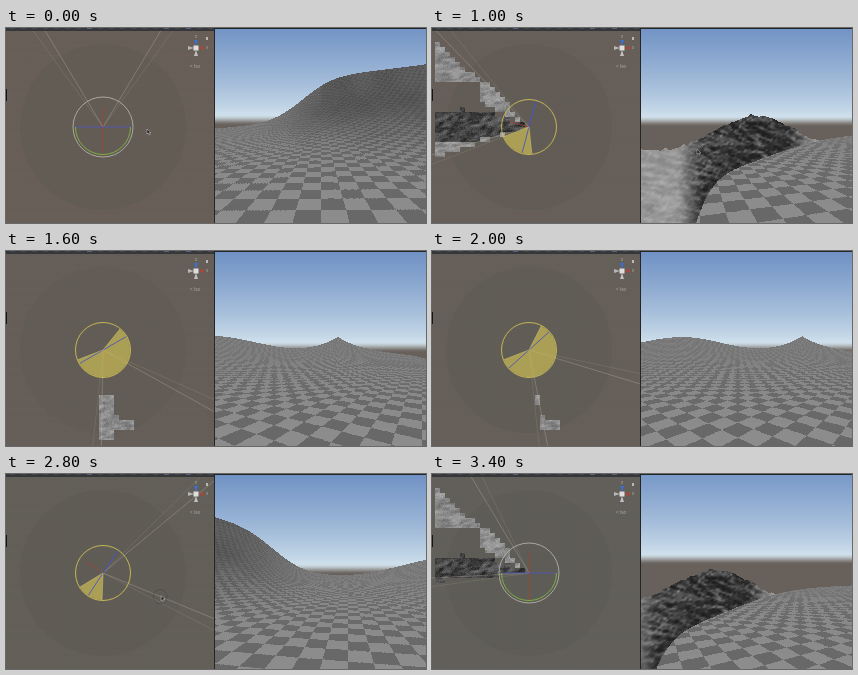
These frames come from a looping animation (420x195 px, 3.5 s). An HTML page with a canvas:

```html
<!DOCTYPE html>
<html lang="en">
<head>
<meta charset="utf-8">
<title>Camera rotation over tiled terrain</title>
<style>
html, body { margin: 0; width: 100%; height: 100%; overflow: hidden; background: #222; }
canvas { display: block; width: 420px; height: 195px; }
</style>
</head>
<body>
<canvas id="stage" width="420" height="195"></canvas>
<script>
const ctx = document.getElementById('stage').getContext('2d');
const LOOP = 3500, STEP = 100;
const CX = 97, CY = 99, FOCAL = 175, VIEW_X = 209, VIEW_W = 211, VIEW_H = 194;
const RAD = Math.PI / 180, HALF_FOV = 31, FAR = 18, TILE = 0.28;

// Time, heading in degrees to the left, terrain eye level, sky horizon.
const POSES = [
  [0, 0, 92, 91], [700, 0, 92, 91], [1200, 125, 96, 93], [1600, 210, 97, 95],
  [1900, 222, 97, 95], [2700, 222, 97, 95], [3000, 392, 94, 92], [3300, 422, 103, 84]
];
const DRAGS = [
  { enter: 100, from: 600, to: 2300, x: 71, y: 109, fromX: 142, fromY: 103, zero: 0, rate: 2.6 },
  { enter: 2300, from: 2700, to: 3300, x: 74, y: 113, fromX: 440, fromY: 150, zero: 222, rate: 1.45 }
];
const PATCHES = [
  { dark: false, d: 'M4 14L24 34L40 46L62 60L74 74L92 95L70 84L56 80L46 68V54H4Z' },
  { dark: true, d: 'M4 84L30 81L60 85L95 97L85 103L40 113H4Z' },
  { dark: false, d: 'M4 103H92V120L70 134V140H4Z' },
  { dark: true, d: 'M46 136L92 116L62 154V173H26L21 154Z' },
  { dark: false, d: 'M17 187H28V182H46V187H58V193H17Z' },
  { dark: false, d: 'M95 142H108V164H114V168H126V180H108V190H95Z' }
].map(p => ({ dark: p.dark, path: new Path2D(p.d) }));

const clamp = (v, a = 0, b = 1) => Math.max(a, Math.min(b, v));
const mix = (a, b, k) => a + (b - a) * k;
const smooth = v => v * v * (3 - 2 * v);
const fade = (a, b, v) => smooth(clamp((v - a) / (b - a)));
const wrap = a => ((a + 180) % 360 + 360) % 360 - 180;
const bump = (b, at, width) => Math.exp(-((wrap(b - at) / width) ** 2));
const plateau = (b, at, half, soft) => 1 / (1 + Math.exp((Math.abs(wrap(b - at)) - half) / soft));

function poseAt(t) {
  const next = POSES.findIndex(p => p[0] > t);
  if (next < 0) return POSES[POSES.length - 1];
  const a = POSES[next - 1], b = POSES[next], k = (t - a[0]) / (b[0] - a[0]);
  return a.map((v, i) => mix(v, b[i], k));
}

function hash(x, y) {
  const s = Math.sin(x * 127.1 + y * 311.7) * 43758.5453;
  return s - Math.floor(s);
}

function noise(x, y) {
  const ix = Math.floor(x), iy = Math.floor(y);
  const fx = smooth(x - ix), fy = smooth(y - iy);
  return mix(mix(hash(ix, iy), hash(ix + 1, iy), fx),
    mix(hash(ix, iy + 1), hash(ix + 1, iy + 1), fx), fy);
}

// Skylines by bearing, as pixels above eye level at the view centre.
const hillAt = b => plateau(b, -30, 36, 5.5);
const groundSkyline = b => -6 + 55 * hillAt(b) - 190 * plateau(b, 129, 34, 4) -
  38 * bump(b, 85, 28) + 18 * Math.exp(-Math.abs(wrap(b - 204.5)) / 9) + 17 * bump(b, 242, 18);
const mountainSkyline = b => -26 + 34 * bump(b, 72, 17) + 20 * bump(b, 121, 10) +
  16 * bump(b, 158, 22);

const view = document.createElement('canvas');
view.width = VIEW_W;
view.height = VIEW_H;
const viewCtx = view.getContext('2d');
const image = viewCtx.createImageData(VIEW_W, VIEW_H);

function put(x, y, r, g = r, b = r) {
  const i = (y * VIEW_W + x) * 4;
  image.data[i] = r;
  image.data[i + 1] = g;
  image.data[i + 2] = b;
  image.data[i + 3] = 255;
}

function skyColor(up) {
  const high = clamp(up / 95) ** 0.7;
  const ground = 1 - fade(-5, 6, up);
  const air = [mix(222, 112, high), mix(236, 146, high), mix(242, 196, high)];
  return [104, 96, 91].map((brown, i) => mix(air[i], brown, ground));
}

function rockShade(bearing, drop, depth) {
  const rough = noise(bearing * 0.5 + drop * 0.2, drop * 0.25) * 0.6 +
    noise(bearing * 1.3 - drop * 0.2, drop * 0.5) * 0.4;
  const sand = 130 + 45 * rough;
  const ripples = 12 * Math.sin(drop * 1.1 + bearing * 0.6) - 20;
  const dune = sand + ripples * fade(120, 140, bearing) * fade(20, 34, drop);
  const rock = 28 + 120 * rough * rough;
  const rocky = fade(53, 60, bearing) * (1 - fade(88, 98, bearing));
  const cap = 0.6 * bump(bearing, 124, 5) * (1 - fade(4, 16, depth));
  return mix(dune, rock, Math.max(rocky, cap));
}

function drawMountain(x, bearing, cos, eye) {
  const top = -mountainSkyline(bearing) + noise(bearing * 0.8, 3) * 3 - 1.5;
  for (let y = Math.max(0, Math.round(eye + top / cos)); y < VIEW_H; y++) {
    const drop = (y - eye) * cos;
    put(x, y, rockShade(bearing, drop, drop - top));
  }
}

function drawGround(x, bearing, cos, eye) {
  const rise = groundSkyline(bearing);
  const far = rise < 0 ? Math.min(FAR, FOCAL / -rise) : FAR;
  const summit = 1 + rise * far / FOCAL;
  const sinB = Math.sin(bearing * RAD), cosB = Math.cos(bearing * RAD);
  const hill = hillAt(bearing);
  let filled = VIEW_H;
  for (let r = 1.1; r < far && filled > 0; r *= 1.006) {
    const k = r / far;
    const height = -1 + summit * k ** 3;
    const y = Math.max(0, Math.round(eye - FOCAL * height / (r * cos)));
    if (y >= filled) continue;
    const odd = (Math.floor(r * sinB / TILE) + Math.floor(r * cosB / TILE)) & 1;
    const contrast = mix(18, 5, clamp((r - 2) / 10));
    const shadow = hill * fade(0.15, 0.75, k) * (45 - 16 * noise(bearing * 0.15, r * 0.3));
    const shade = 122 - shadow + (odd ? contrast : -contrast);
    while (filled > y) put(x, --filled, shade);
  }
}

function drawView(heading, eye, horizon) {
  for (let y = 0; y < VIEW_H; y++) {
    const rgb = skyColor(horizon - y);
    for (let x = 0; x < VIEW_W; x++) put(x, y, ...rgb);
  }
  for (let x = 0; x < VIEW_W; x++) {
    const delta = Math.atan((VIEW_W / 2 - x) / FOCAL);
    const bearing = (heading + delta / RAD + 360) % 360;
    drawMountain(x, bearing, Math.cos(delta), eye);
    drawGround(x, bearing, Math.cos(delta), eye);
  }
  viewCtx.putImageData(image, 0, 0);
  ctx.drawImage(view, VIEW_X, 1);
}

function line(x1, y1, x2, y2, color, width = 1) {
  ctx.strokeStyle = color;
  ctx.lineWidth = width;
  ctx.beginPath();
  ctx.moveTo(x1, y1);
  ctx.lineTo(x2, y2);
  ctx.stroke();
}

function ray(angle, length, color, width = 0.8, back = 0) {
  const c = Math.cos(angle * RAD), s = Math.sin(angle * RAD);
  line(CX - c * back, CY - s * back, CX + c * length, CY + s * length, color, width);
}

function arc(x, y, r, color, width = 1, to = 360) {
  ctx.strokeStyle = color;
  ctx.lineWidth = width;
  ctx.beginPath();
  ctx.arc(x, y, r, 0, to * RAD);
  ctx.stroke();
}

function rect(x, y, w, h, color) {
  ctx.fillStyle = color;
  ctx.fillRect(x, y, w, h);
}

function drawTile(x, y, size, dark) {
  for (let v = y; v < y + size; v++) {
    for (let u = x; u < x + size; u++) {
      const n = noise(u * 0.2 + v * 0.15, v * 0.35) * 0.7 + hash(u, v) * 0.3;
      const g = Math.round(dark ? 25 + n * 95 : 105 + n * 70);
      rect(u, v, 1, 1, `rgb(${g},${g},${g})`);
    }
  }
}

// Only tiles inside the camera's field of view are loaded.
function drawTiles(forward) {
  const size = 5;
  for (let y = 14; y < 193; y += size) {
    for (let x = 3; x < 128; x += size) {
      const px = x + size / 2, py = y + size / 2;
      const angle = Math.atan2(py - CY, px - CX) / RAD;
      if (Math.abs(wrap(angle - forward)) > HALF_FOV + 2) continue;
      const patch = PATCHES.find(p => ctx.isPointInPath(p.path, px, py));
      if (patch) drawTile(x, y, size, patch.dark);
    }
  }
}

function drawCompass() {
  const cone = (turn, color) => {
    ctx.save();
    ctx.translate(190, 20);
    ctx.rotate(turn * RAD);
    ctx.fillStyle = color;
    ctx.fill(new Path2D('M-2 -8H2L0 -2Z'));
    ctx.restore();
  };
  ['#3d6fd0', '#a8483c', '#c0c0c0', '#b5b5b5'].forEach((color, i) => cone(i * 90, color));
  rect(187.5, 17.5, 5, 5, '#dedede');
  rect(200, 9, 2, 3, '#b8b8b8');
  ctx.fillStyle = '#aaa';
  ctx.font = '4.5px Arial, "Liberation Sans", sans-serif';
  ctx.fillText('z', 189, 10);
  ctx.fillText('x', 200, 21);
  ctx.fillText('< Iso', 184, 40);
}

function drawRotator(drag, turned) {
  ray(-90 - turned, 20, 'rgba(175,65,50,.75)', 0.9, drag ? 0 : 28);
  ray(-turned, 27, 'rgba(78,86,180,.9)', 1, 27);
  if (!drag) {
    arc(CX, CY, 30, 'rgba(205,203,195,.75)', 0.9);
    arc(CX, CY, 27.5, 'rgba(130,190,65,.85)', 1, 180);
    return;
  }
  const start = Math.atan2(drag.y - CY, drag.x - CX) / RAD;
  ctx.fillStyle = 'rgba(195,182,85,.75)';
  ctx.beginPath();
  ctx.moveTo(CX, CY);
  ctx.arc(CX, CY, 27, (start - turned) * RAD, start * RAD);
  ctx.fill();
  ray(-turned, 27, 'rgba(78,86,180,.9)', 1, 27);
  arc(CX, CY, 27.5, 'rgba(222,204,85,.8)');
  for (const edge of [start, start - turned]) ray(edge, 27, 'rgba(205,192,105,.7)');
}

function drawScene(t, heading, drag) {
  const forward = -90 - heading, age = t / LOOP;
  ctx.save();
  ctx.beginPath();
  ctx.rect(0, 0, 208, 195);
  ctx.clip();
  rect(0, 0, 208, 195, `rgb(${mix(104, 97, age)},${mix(94, 95, age)},${mix(88, 89, age)})`);
  for (let p = 7; p < 208; p += 10) {
    line(p + 0.5, 3, p + 0.5, 195, 'rgba(200,139,85,.025)');
    line(0, p + 0.5, 208, p + 0.5, 'rgba(200,139,85,.025)');
  }
  ctx.fillStyle = 'rgba(90,89,82,.4)';
  ctx.beginPath();
  ctx.arc(CX, CY, 83, 0, 2 * Math.PI);
  ctx.fill();

  drawTiles(forward);
  for (const side of [-1, 1]) {
    ray(forward + side * HALF_FOV, 240, 'rgba(200,192,176,.38)');
    ray(forward + side * (HALF_FOV + 5), 240, 'rgba(200,192,176,.18)');
  }
  drawRotator(drag, drag ? heading - drag.zero : 0);
  drawCompass();
  rect(0, 0, 208, 3, '#36373a');
  for (let x = 4; x < 204; x += 11) rect(x, 0, 5, 1, hash(x, 2) > 0.6 ? '#53657c' : '#46474a');
  rect(0, 61, 1, 12, '#151515');
  ctx.restore();
}

function drawCursor(t, heading) {
  const drag = DRAGS.find(d => t <= d.to);
  if (!drag) return;
  const pressed = t >= drag.from;
  const turned = pressed ? heading - drag.zero : 0;
  const k = 1 - (1 - clamp((t - drag.enter) / (drag.from - drag.enter))) ** 3;
  const x = mix(drag.fromX, drag.x, k) + turned * drag.rate;
  const y = mix(drag.fromY, drag.y, k) + turned * 0.19;
  if (pressed) arc(x - 2, y - 1, 7, 'rgba(50,50,50,.4)', 0.8);
  const arrow = new Path2D(`M${x - 1} ${y - 2}v5l1.2 -1l.9 1.800l1 -.5l-.8 -1.700h1.500Z`);
  ctx.fillStyle = '#161616';
  ctx.fill(arrow);
  ctx.strokeStyle = '#d8d8d8';
  ctx.lineWidth = 0.5;
  ctx.stroke(arrow);
}

function render(t) {
  const [, heading, eye, horizon] = poseAt(t);
  const drag = DRAGS.find(d => t >= d.from && t <= d.to);
  rect(0, 0, 420, 195, '#242526');
  drawScene(t, heading, drag);
  drawView(heading, eye, horizon);
  drawCursor(t, heading);
}

let shown = -1;
const began = performance.now();
function tick() {
  const t = Math.floor((performance.now() - began) % LOOP / STEP) * STEP;
  if (t !== shown) render(shown = t);
  requestAnimationFrame(tick);
}
tick();
</script>
</body>
</html>
```
